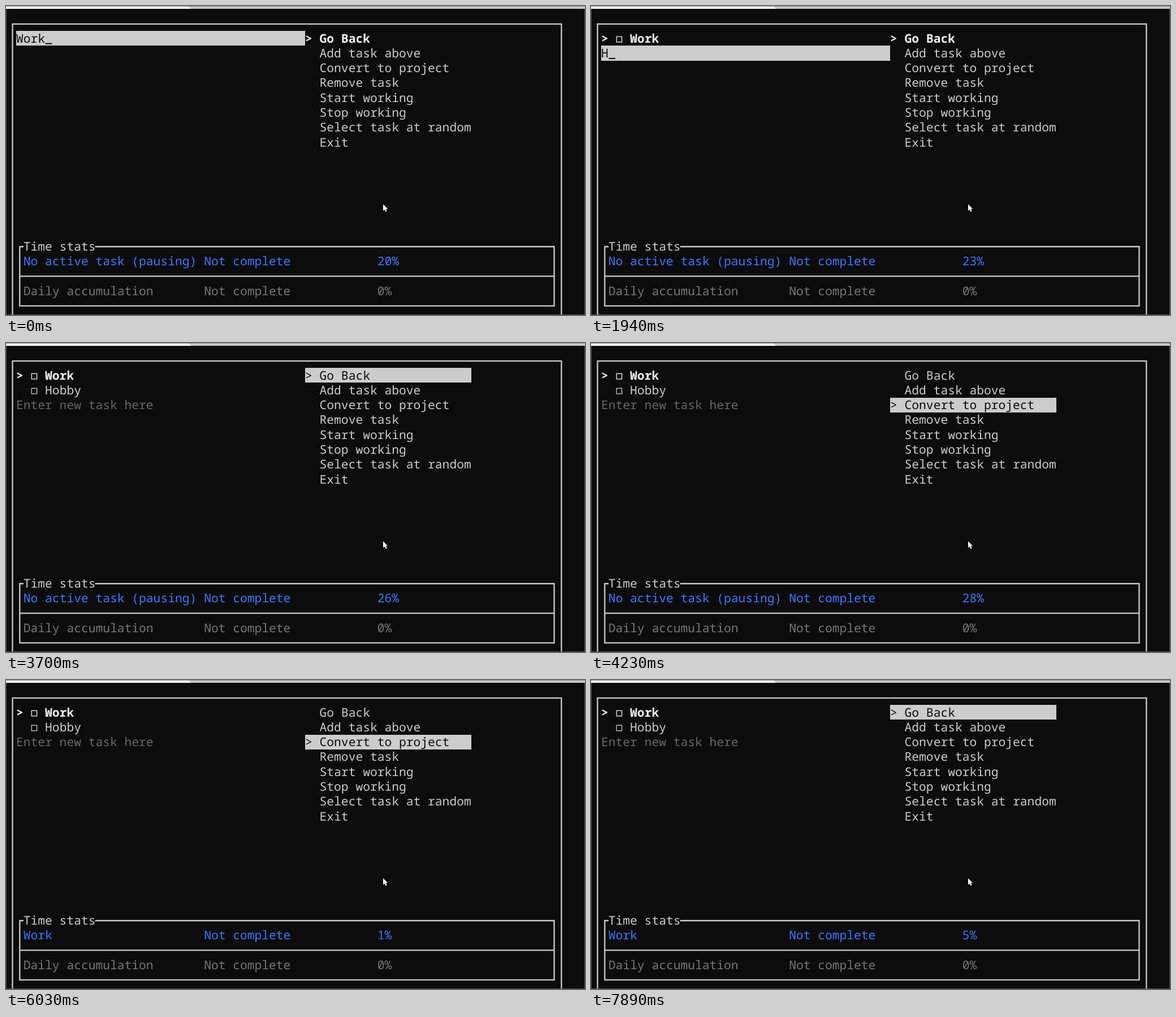
An HTML page with a canvas that plays this animation: 1024 by 547 pixels, repeating every 8 s.

```html
<!DOCTYPE html>
<html lang="en">
<head>
<meta charset="utf-8">
<title>Task terminal</title>
<style>
  html, body { margin: 0; width: 100%; height: 100%; overflow: hidden; background: #0c0c0c; }
  canvas { display: block; }
</style>
</head>
<body>
<canvas id="stage" width="1024" height="547"></canvas>
<script>
const ctx = document.getElementById('stage').getContext('2d');
const LOOP = 8000, CELL = 12.775, LINE = 26.29, LEFT = 18, TOP = 44.1;
const BACK = '#0c0c0c', FORE = '#cccccc', WHITE = '#f2f2f2', BLUE = '#3b78ff', DIM = '#767676', FAINT = '#666666';
const MENU = ['Go Back', 'Add task above', 'Convert to project', 'Remove task',
  'Start working', 'Stop working', 'Select task at random', 'Exit'];

// Each step: time in ms, then the values that change.
const STEPS = [
  [0, { tasks: [], typed: 'Work', focus: 'input', item: 0, active: 'No active task (pausing)', seconds: 12 }],
  [370, { seconds: 13 }],
  [910, { tasks: ['Work'], typed: '' }],
  [1570, { seconds: 14 }],
  [1940, { typed: 'H' }],
  [2070, { typed: 'Ho' }],
  [2320, { typed: 'Hob' }],
  [2440, { typed: 'Hobb', seconds: 15 }],
  [2560, { typed: 'Hobby' }],
  [2960, { tasks: ['Work', 'Hobby'], typed: '' }],
  [3330, { focus: 'list', seconds: 16 }],
  [3700, { focus: 'menu' }],
  [3950, { item: 1 }],
  [4230, { item: 2, seconds: 17 }],
  [4350, { item: 3 }],
  [4500, { item: 4 }],
  [5130, { active: 'Work', seconds: 0 }],
  [5280, { seconds: 1 }],
  [5780, { item: 3 }],
  [6030, { item: 2 }],
  [6150, { item: 1, seconds: 2 }],
  [6300, { item: 0 }],
  [6830, { focus: 'list' }],
  [7390, { seconds: 3 }],
  [7890, { focus: 'menu' }]
];

const colX = col => LEFT + col * CELL;
const rowY = row => Math.round(TOP + row * LINE);
const baseline = row => TOP + row * LINE + 20.5;

function box(x, y, w, h, color) {
  ctx.fillStyle = color;
  ctx.fillRect(x, y, w, h);
}

function text(str, col, row, color = FORE, bold = false) {
  ctx.font = `${bold ? 600 : 500} 21.29px "Noto Sans Mono", "DejaVu Sans Mono", monospace`;
  ctx.fillStyle = color;
  ctx.fillText(str, colX(col), baseline(row));
}

function bar(from, to, row, color) {
  const x = Math.round(colX(from));
  box(x, rowY(row), Math.round(colX(to)) - x, rowY(row + 1) - rowY(row), color);
}

function checkbox(row, color) {
  ctx.strokeStyle = color;
  ctx.lineWidth = 1.3;
  ctx.strokeRect(45.2, rowY(row) + 10.2, 9.4, 9.6);
}

function polygon(points, color) {
  ctx.beginPath();
  points.forEach(([x, y]) => ctx.lineTo(x, y));
  ctx.closePath();
  ctx.fillStyle = color;
  ctx.fill();
}

function drawWindow() {
  box(0, 0, 1024, 547, BACK);
  box(0, 0, 1024, 5, '#c8c8c8');
  polygon([[0, 0], [322, 0], [327, 5], [0, 5]], '#ffffff');
  box(0, 0, 1024, 1, '#8a8a8a');
  box(0, 5, 1, 542, '#555555');
  box(1023, 5, 1, 542, '#555555');
  box(0, 546, 1024, 1, '#555555');
}

function drawBorders() {
  ctx.strokeStyle = FORE;
  ctx.lineWidth = 2.3;
  ctx.beginPath();
  ctx.moveTo(11.5, 546);
  ctx.lineTo(11.5, 31.8);
  ctx.lineTo(982.3, 31.8);
  ctx.lineTo(982.3, 546);
  ctx.moveTo(31, 426);
  ctx.lineTo(24.3, 426);
  ctx.lineTo(24.3, 530.8);
  ctx.lineTo(969.5, 530.8);
  ctx.lineTo(969.5, 426);
  ctx.lineTo(157.5, 426);
  ctx.moveTo(24.3, 478.4);
  ctx.lineTo(969.5, 478.4);
  ctx.stroke();
}

function drawTasks(s) {
  s.tasks.forEach((name, row) => {
    const first = row === 0, lit = first && s.focus === 'list';
    const color = lit ? BACK : first ? WHITE : FORE;
    if (lit) bar(0, 40, row, FORE);
    if (first) text('>', 0, row, color, !lit);
    checkbox(row, color);
    text(name, 4, row, color, first && !lit);
  });

  const row = s.tasks.length, focused = s.focus === 'input';
  if (s.typed) {
    bar(0, 40, row, FORE);
    text(s.typed, 0, row, BACK);
    box(colX(s.typed.length) + 0.5, baseline(row) + 1, CELL - 1, 2, BACK);
  } else {
    if (focused) bar(0, 40, row, FAINT);
    text('Enter new task here', 0, row, focused ? BACK : FAINT);
  }
}

function drawMenu(s) {
  MENU.forEach((name, row) => {
    const chosen = row === s.item, lit = chosen && s.focus === 'menu';
    const color = lit ? BACK : chosen ? WHITE : FORE;
    if (lit) bar(40, 63, row, FORE);
    if (chosen) text('>', 40, row, color, !lit);
    text(name, 42, row, color, chosen && !lit);
  });
}

function drawStats(s) {
  const line = (row, name, percent, color) => {
    text(name, 1, row, color);
    text('Not complete', 26, row, color);
    text(percent + '%', 50, row, color);
  };
  text('Time stats', 1, 14);
  line(15, s.active, Math.floor(s.seconds * 100 / 60), BLUE);
  line(17, 'Daily accumulation', 0, DIM);
}

function drawPointer() {
  polygon([[667, 351], [667, 362.5], [669.7, 360.2], [671.6, 364.2],
    [673.6, 363.3], [671.8, 359.4], [675.2, 359.2]], '#ffffff');
}

function render(time) {
  const state = {};
  for (const [at, change] of STEPS) if (at <= time) Object.assign(state, change);
  drawWindow();
  drawBorders();
  drawTasks(state);
  drawMenu(state);
  drawStats(state);
  drawPointer();
}

ctx.textBaseline = 'alphabetic';
ctx.textRendering = 'geometricPrecision';
const start = performance.now();
function tick() {
  render((performance.now() - start) % LOOP);
  requestAnimationFrame(tick);
}
tick();
</script>
</body>
</html>
```
